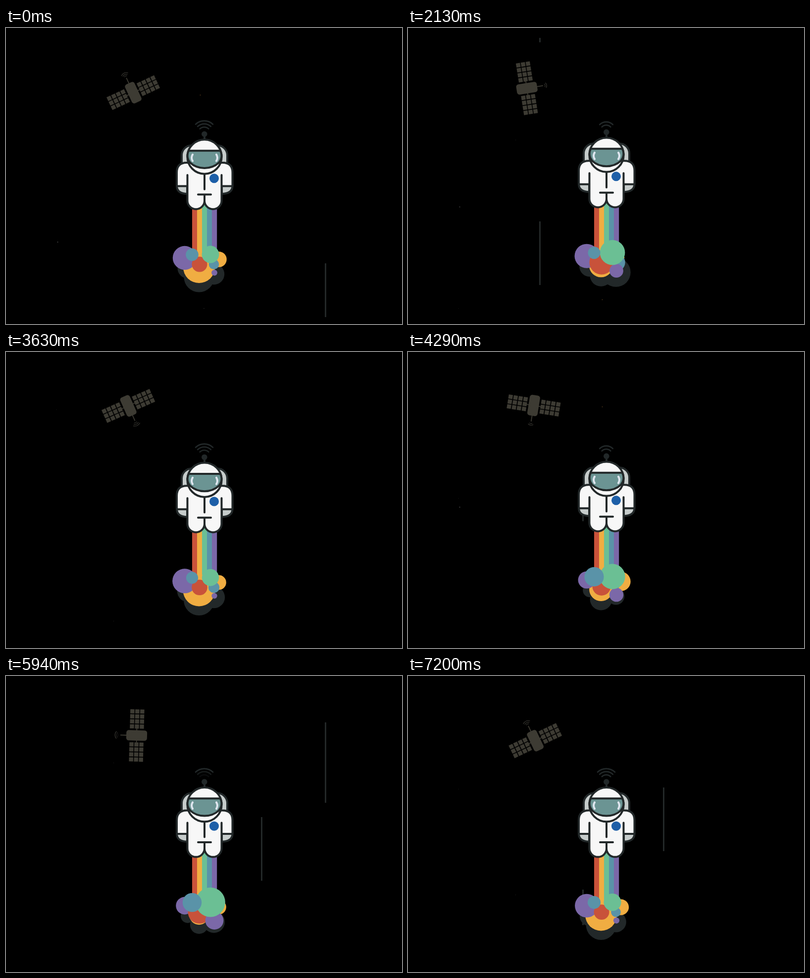
An HTML page that plays this animation: 800x600 px, repeating every 7.23 s.

```html
<!DOCTYPE html>
<html lang="en">
<head>
<meta charset="utf-8">
<title>Rainbow astronaut</title>
<style>
  html, body { margin: 0; width: 100%; height: 100%; overflow: hidden; background: #000; }
  svg { display: block; width: 800px; height: 600px; }
  .line { fill: none; stroke: #222829; stroke-width: 4; stroke-linecap: round; stroke-linejoin: round; }
  .suit { fill: #f7f7f7; }
  .grey { fill: #c6cccb; }
</style>
</head>
<body>
<svg viewBox="0 0 800 600">
  <rect width="800" height="600"/>
  <g id="stars"></g>
  <g id="streaks" fill="#232828"></g>
  <g id="satellite" fill="#3d3b33" stroke="#3d3b33" stroke-width="0">
    <path d="M0-20V-33M-16 0H16" stroke-width="1.8"/>
    <rect x="-10.5" y="-21" width="21" height="42" rx="5"/>
    <g id="panels"></g>
    <g id="satWaves" fill="none" stroke="#33322d" stroke-width="1.3"></g>
  </g>
  <g id="flyer">
    <g id="shadow" fill="#222829"></g>
    <g id="rainbow"></g>
    <g id="smoke"></g>
    <g class="line">
      <rect class="grey" x="355" y="238" width="92" height="62" rx="20"/>
      <path class="grey" d="M345 318V321Q346 336 366 336V318ZM457.500 318V321Q456.500 336 436 336V318Z"/>
      <path class="suit" d="M345 320.500V293Q345 273 365 273H437.500Q457.500 273 457.500 293V320.500H436H345Z"/>
      <path class="suit" stroke="none" d="M366.500 275H435.500V350a17.250 17.250 0 0 1-34.500 0a17.250 17.250 0 0 1-34.500 0Z"/>
      <path d="M366.500 298V350a17.250 17.250 0 0 0 34.500 0a17.250 17.250 0 0 0 34.500 0V298"/>
      <path d="M401 296V327M388 337.500H414M401 337.500V352"/>
      <circle class="suit" cx="401" cy="261" r="34.700"/>
      <path fill="#6b9493" d="M369 248.700H433Q439 262 430 273Q418 284 401 284Q384 284 372 273Q363 262 369 248.700Z"/>
      <path stroke="#dfe6ef" d="M377 256.500Q373 263 377 269.500M425 256.500Q429 263 425 269.500"/>
      <path d="M401 216V225"/>
    </g>
    <circle cx="420.500" cy="304.700" r="9.500" fill="#1d5fa8"/>
    <circle cx="400.800" cy="215" r="5.800" fill="#222829"/>
    <g id="waves" transform="translate(400.500 213.500)" fill="none" stroke="#222829" stroke-width="2.700" stroke-linecap="round"></g>
  </g>
</svg>
<script>
const STEP = 30, LOOP = 7230;
const RED = '#c8523a', YELLOW = '#f0ad42', GREEN = '#6bbf94', BLUE = '#5a93a8', PURPLE = '#7b68a8';
const $ = id => document.getElementById(id);

function add(parent, tag, attrs) {
  const el = document.createElementNS('http://www.w3.org/2000/svg', tag);
  set(el, attrs);
  parent.appendChild(el);
  return el;
}
function set(el, attrs) {
  for (const name in attrs) el.setAttribute(name, attrs[name]);
}
const mod = (a, n) => ((a % n) + n) % n;
const clamp = v => Math.max(0, Math.min(1, v));
const wave = (p, peak, mean, amp) => mean + amp * Math.cos((p - peak) * Math.PI / 15);

// Signal arcs, inner first
function arcs(parent, radii) {
  return radii.map(r => {
    const x = r * 0.69, y = -r * 0.724;
    return add(parent, 'path', { d: `M${-x} ${y}A${r} ${r} 0 0 1 ${x} ${y}` });
  });
}
const bigArcs = arcs($('waves'), [12.7, 19.2, 25.3]);
$('satWaves').setAttribute('transform', 'translate(0 -33)');
const smallArcs = arcs($('satWaves'), [4.2, 7.5, 10.8]);

// Solar panels: 4 by 3 cells on either side
for (const side of [-1, 1])
  for (let col = 0; col < 4; col++)
    for (let row = -1; row <= 1; row++)
      add($('panels'), 'rect', { x: side * (18.2 + col * 10.2) - 4.2, y: row * 10 - 4.2, width: 8.4, height: 8.4 });

[RED, YELLOW, GREEN, BLUE, PURPLE].forEach((fill, i) =>
  add($('rainbow'), 'rect', { x: 376 + i * 10, y: 345, width: 10.2, height: 120, fill }));

// Pulsing puffs: centre, radius rule, colour
const swell = p => wave(p, 16.8, 23.5, 6.5);
const left = p => wave(p, 5.5, 22.1, 5.2);
const right = p => wave(p, 9.2, 23.5, 6.5);
const puffs = [
  [367, 487, p => left(p) - 3.7],
  [390, 505, p => 48 - swell(p)],
  [420, 499, right],
  [430, 469, p => 37 - right(p), YELLOW],
  [390, 485, p => 49.5 - swell(p), YELLOW],
  [361, 466, left, PURPLE],
  [420, 479, p => right(p) - 11, BLUE],
  [391, 479, p => wave(p, 13.5, 20.3, 5), RED],
  [421, 496, p => swell(p) - 11.5, PURPLE],
  [413, 459, swell, GREEN],
  [376, 459.5, p => 37 - left(p), BLUE]
].map(([cx, cy, radius, fill]) => ({
  radius,
  el: add($(fill ? 'smoke' : 'shadow'), 'circle', fill ? { cx, cy, fill } : { cx, cy })
}));

// Falling stars: x, frame, y at that frame, speed, radius, colour, wrap distance
const stars = [
  [104.5, 0, 434, 23.22, 1.2, '#666', 860],
  [102, 33, 258, 8.17, 0.7, '#333', 860],
  [217.5, 71, 227, 6.37, 0.8, '#2c2c2c', 860],
  [392.5, 0, 136, 5.84, 1.2, '#6a4a22', 860],
  [400, 0, 568.5, 8, 0.9, '#444', 860],
  [283, 33, 33, 20, 3.2, '#80602c', 6000]
].map(([x, frame, y, speed, r, fill, wrap]) => {
  let points = '';
  for (let i = 0; i < 10; i++) {
    const a = i * Math.PI / 5, d = i % 2 ? r * 0.5 : r;
    points += `${d * Math.sin(a)},${-d * Math.cos(a)} `;
  }
  return { x, frame, y, speed, wrap, el: add($('stars'), 'polygon', { points, fill }) };
});

// Streak passes: x, length, lane end, frame, top at that frame
const streaks = [
  [645.5, 163, 586, 0, 477], [645.5, 163, 586, 198, 94],
  [266.5, 129, 586, 71, 392], [266.5, 129, 586, 99, 460],
  [175.5, 96, 586, 99, 416],
  [516.5, 129, 452, 99, 406], [516.5, 129, 452, 198, 286], [516.5, 129, 452, 240, 226],
  [353.5, 72, 586, 143, 271], [353.5, 72, 586, 240, 433]
].map(([x, length, end, frame, top]) => ({
  length, end, frame, top,
  el: add($('streaks'), 'rect', { x: x - 1.5, width: 3 })
}));

function draw(ms) {
  const k = Math.floor(mod(ms, LOOP) / STEP);
  const p = k ? k - 0.3 : 0;

  const bob = -2 * (1 - Math.cos(p * 2 * Math.PI / 3));
  set($('flyer'), { transform: `translate(0 ${bob})` });
  set($('satellite'), { transform: `translate(252 120.2) rotate(${p * 1.5 - 25}) translate(0 12)` });

  for (const puff of puffs) set(puff.el, { r: puff.radius(p) });

  const beat = mod(p, 24);
  for (let i = 0; i < 3; i++) {
    const opacity = beat >= 17 + 3 * i ? 1 : clamp(1 - (beat - 3 * i) / 8);
    set(bigArcs[i], { opacity });
    set(smallArcs[i], { opacity });
  }

  for (const s of stars) {
    const y = mod(s.y + s.speed * (k - s.frame) + 130, s.wrap) - 130;
    set(s.el, { transform: `translate(${s.x} ${y})` });
  }
  for (const s of streaks) {
    const top = s.top + 20 * (k - s.frame);
    const y = Math.max(20, top);
    set(s.el, { y, height: Math.max(0, Math.min(s.end, top + s.length) - y) });
  }
}

const start = performance.now();
function tick() {
  draw(performance.now() - start);
  requestAnimationFrame(tick);
}
draw(0);
requestAnimationFrame(tick);
</script>
</body>
</html>
```
